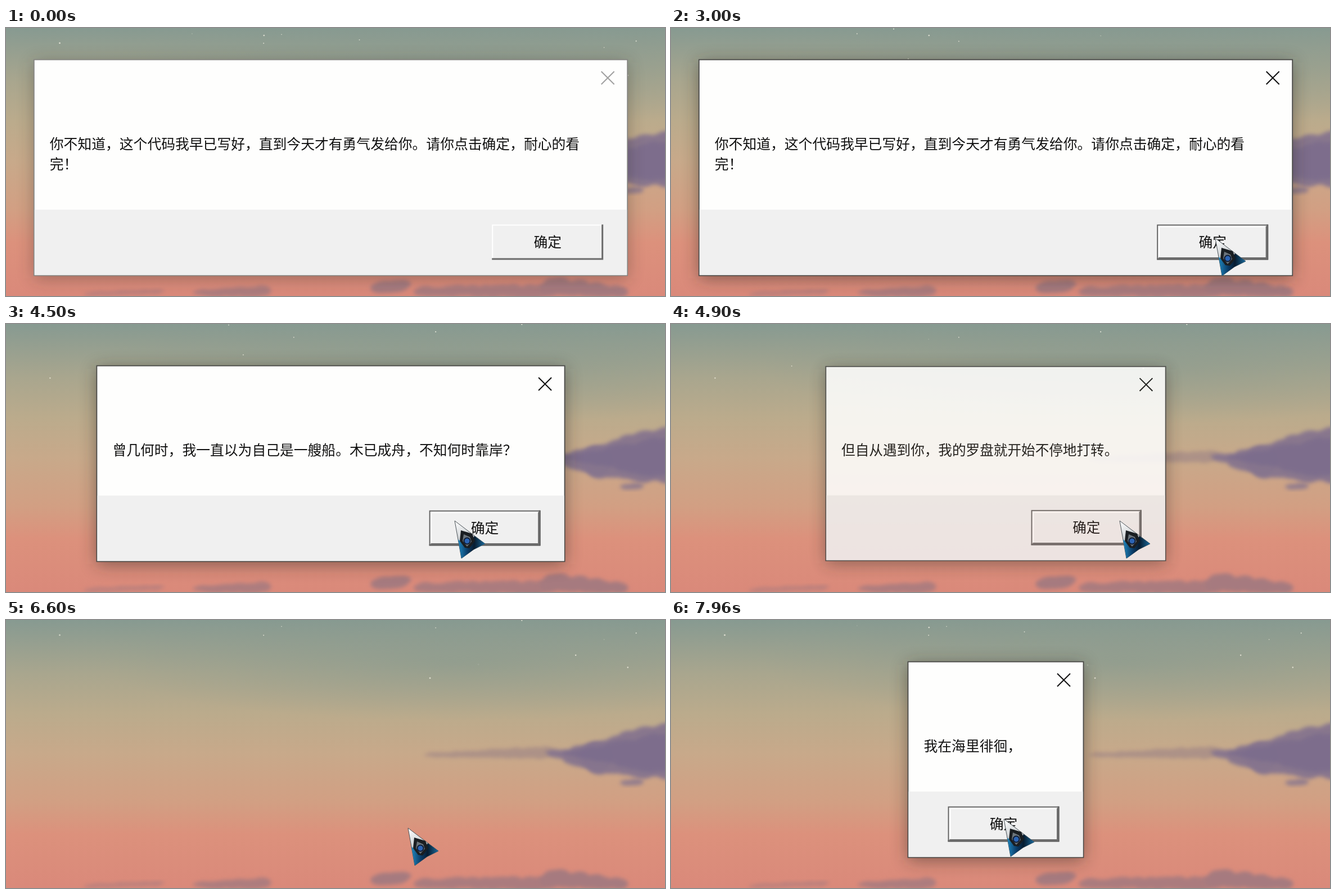
An HTML page that plays this animation: 1172 by 478 pixels, repeating every 8000 ms.

```html
<!DOCTYPE html>
<html lang="zh-CN">
<head>
<meta charset="utf-8">
<title>对话框</title>
<style>
html, body { margin: 0; width: 100%; height: 100%; overflow: hidden; background: #c8a88a; }
svg { display: block; width: 100%; height: 100%; }
text { font: 24.8px "Noto Sans CJK SC", "Noto Sans CJK", sans-serif; fill: #101010; }
</style>
</head>
<body>
<svg viewBox="0 0 1172 478">
  <defs>
    <linearGradient id="sky" x2="0" y2="1">
      <stop offset="0" stop-color="#879a91"/>
      <stop offset=".2" stop-color="#a9a68e"/>
      <stop offset=".35" stop-color="#bbab8c"/>
      <stop offset=".5" stop-color="#c8a98a"/>
      <stop offset=".68" stop-color="#d29f83"/>
      <stop offset=".8" stop-color="#dc917c"/>
      <stop offset="1" stop-color="#da897a"/>
    </linearGradient>
    <radialGradient id="haze">
      <stop offset="0" stop-color="#84988f" stop-opacity=".5"/>
      <stop offset="1" stop-color="#84988f" stop-opacity="0"/>
    </radialGradient>
    <linearGradient id="steel" x2=".4" y2="1">
      <stop offset="0" stop-color="#fff"/>
      <stop offset=".6" stop-color="#c3c8cb"/>
    </linearGradient>
    <linearGradient id="blue" x2="1">
      <stop offset="0" stop-color="#1f86bd"/>
      <stop offset=".35" stop-color="#0b3c68"/>
      <stop offset=".6" stop-color="#071c30"/>
      <stop offset="1" stop-color="#1a6a9c"/>
    </linearGradient>
    <filter id="soft" x="-20%" y="-30%" width="140%" height="160%"><feGaussianBlur stdDeviation="3.5"/></filter>
    <filter id="shade" x="-30%" y="-30%" width="160%" height="160%"><feGaussianBlur stdDeviation="15"/></filter>
  </defs>

  <rect width="1172" height="478" fill="url(#sky)"/>
  <ellipse cx="800" cy="75" rx="640" ry="105" fill="url(#haze)"/>
  <g id="clouds"></g>
  <g id="stars" fill="#f0eee0"></g>
  <g id="dialogs"></g>

  <g id="cursor" stroke-linejoin="round">
    <path d="M0 0L54 41L34 51L12 67Z" fill="url(#steel)" stroke="#4b5358"/>
    <path d="M6 33L22 48L35 27L54 41L34 51L12 67Z" fill="url(#blue)"/>
    <path d="M11 17L31 23L36 36L26 49L18 48L9 36Z" fill="#1a1e22"/>
    <path d="M16 24L27 29L30 37L22 46L14 36Z" fill="#6c757c"/>
    <circle cx="22" cy="36" r="5.500" fill="#2c64b4" stroke="#0e1c34" stroke-width="2"/>
  </g>
</svg>
<script>
const LOOP = 8000;
const $ = id => document.getElementById(id);
const clamp = v => Math.max(0, Math.min(1, v));
const smooth = v => v * v * (3 - 2 * v);
const mix = (a, b, k) => a + (b - a) * k;

let seed = 11;
const rand = () => (seed = seed * 16807 % 2147483647) / 2147483647;

function add(parent, tag, attrs, text) {
  const el = document.createElementNS('http://www.w3.org/2000/svg', tag);
  for (const k in attrs) el.setAttribute(k, attrs[k]);
  if (text) el.textContent = text;
  parent.appendChild(el);
  return el;
}

// A bank of puffs between two ends, each end given as [x, y, half height]
function cloud(a, b, fill, opacity = 1) {
  const g = add($('clouds'), 'g', { fill, opacity, filter: 'url(#soft)' });
  const n = Math.ceil((b[0] - a[0]) / 6);
  for (let i = 0; i <= n; i++) {
    const k = i / n, h = mix(a[2], b[2], k), ry = h * (.5 + .4 * rand());
    add(g, 'ellipse', {
      cx: mix(a[0], b[0], k), cy: mix(a[1], b[1], k) + (2 * rand() - 1) * (h - ry),
      rx: 10 + ry * .7, ry
    });
  }
}

const mauve = '#86758e', rose = '#a67a7f';
cloud([755, 241, 5], [960, 236, 12], '#a48a86', .75);
cloud([972, 239, 7], [1050, 243, 30], mauve, .95);
cloud([1050, 246, 30], [1180, 234, 62], mauve, .95);
cloud([1000, 238, 4], [1170, 238, 40], '#76688c', .6);
cloud([1106, 290, 6], [1120, 290, 7], mauve, .8);
cloud([665, 461, 13], [705, 461, 13], rose);
cloud([740, 469, 10], [950, 470, 14], rose, .9);
cloud([968, 459, 20], [1090, 471, 11], rose);
cloud([345, 473, 7], [455, 470, 11], rose, .85);
cloud([150, 474, 4], [270, 470, 5], rose, .6);

// Each star is lit for about half the loop
const stars = Array.from({ length: 20 }, () => {
  const el = add($('stars'), 'circle', { cx: 1172 * rand(), cy: 110 * rand() ** 2, r: .7 + .8 * rand() });
  return { el, phase: rand() };
});

// rest: pointer while reading; aim: pointer on the button
const dialogs = [
  { open: -500, active: 2900, close: 3080, rest: [604, 321], aim: [968, 375],
    lines: ['你不知道，这个代码我早已写好，直到今天才有勇气发给你。请你点击确定，耐心的看', '完！'] },
  { open: 3230, close: 4660, rest: [532, 281], aim: [798, 351],
    lines: ['曾几何时，我一直以为自己是一艘船。木已成舟，不知何时靠岸？'] },
  { open: 4800, close: 6500, rest: [540, 300], aim: [715, 371],
    lines: ['但自从遇到你，我的罗盘就开始不停地打转。'] },
  { open: 6720, close: 8100, rest: [560, 310], aim: [592, 355],
    lines: ['我在海里徘徊，'] }
];
const ENTER = { time: 900, at: [655, 482] };
const CX = 577.500, CY = 249;

// Drawn around its centre, sized by its text
function buildDialog(d) {
  const w = Math.max(312, d.lines[0].length * 24.8 + 113), h = 349 + 36 * (d.lines.length - 1);
  const x = -w / 2, y = -h / 2, right = w / 2, bottom = h / 2;
  const g = d.el = add($('dialogs'), 'g', {});
  const line = (parent, path, stroke, width) =>
    add(parent, 'path', { d: path, stroke, 'stroke-width': width, fill: 'none' });

  d.shadow = add(g, 'rect', { x, y: y + 5, width: w, height: h, fill: '#2a2522', filter: 'url(#shade)' });
  d.frame = add(g, 'rect', { x, y, width: w, height: h, fill: '#fefefd', 'stroke-width': 1.8 });
  add(g, 'rect', { x: x + 1, y: bottom - 117.500, width: w - 2, height: 116.500, fill: '#f0f0f0' });
  d.cross = line(g, `M${right - 46.500} ${y + 21}l23 23m0 -23l-23 23`, '', 2);
  d.lines.forEach((s, i) => add(g, 'text', { x: x + 28, y: y + 159 + 36 * i }, s));

  const bw = 198, bh = 63, b = add(g, 'g', { transform: `translate(${right - 43 - bw} ${bottom - 91})` });
  line(b, `M1 ${bh - 3}V1H${bw - 3}`, '#fff', 2);
  line(b, `M0 ${bh - 1.500}H${bw - 1.500}V0`, '#6b6b6b', 3);
  d.ring = add(b, 'g', {});
  line(d.ring, `M3.500 ${bh - 5}V3.500H${bw - 5}`, '#fff', 3);
  line(d.ring, `M3 ${bh - 3}H${bw - 3}V3`, '#6f6f6f', 3);
  line(d.ring, `M1 1H${bw - 1}V${bh - 1}H1Z`, '#646464', 2);
  add(b, 'text', { x: bw / 2, y: bh / 2 + 8.800, 'text-anchor': 'middle' }, '确定');
}

function drawDialog(d, t) {
  const show = smooth(clamp((t - d.open) / 130)) * (1 - clamp((t - d.close) / 80));
  d.el.style.display = show ? '' : 'none';
  const on = t >= (d.active || 0);
  d.el.setAttribute('opacity', show);
  d.el.setAttribute('transform', `translate(${CX} ${CY}) scale(${mix(.94, 1, show)})`);
  d.shadow.setAttribute('opacity', on ? .5 : .35);
  d.frame.setAttribute('stroke', on ? '#4a4a48' : '#858582');
  d.cross.setAttribute('stroke', on ? '#111' : '#a0a0a0');
  d.ring.style.display = on ? '' : 'none';
}

// Moves to the reading spot after a dialog opens, then to its button before it closes
function pointer(t) {
  let pos = ENTER.at;
  const go = (to, from, ms) => {
    const k = smooth(clamp((t - from) / ms));
    pos = pos.map((v, i) => mix(v, to[i], k));
  };
  for (const d of dialogs) {
    go(d.rest, Math.max(d.open, ENTER.time) + 100, 470);
    go(d.aim, d.close - 800, 500);
  }
  return pos;
}

dialogs.forEach(buildDialog);

function render(t) {
  for (const s of stars)
    s.el.setAttribute('opacity', .8 * clamp(3 * Math.sin(2 * Math.PI * (t / LOOP + s.phase))));
  dialogs.forEach(d => drawDialog(d, t));
  $('cursor').style.display = t < ENTER.time ? 'none' : '';
  $('cursor').setAttribute('transform', `translate(${pointer(t)})`);
}

const start = performance.now();
function tick() {
  render((performance.now() - start) % LOOP);
  requestAnimationFrame(tick);
}
tick();
</script>
</body>
</html>
```
